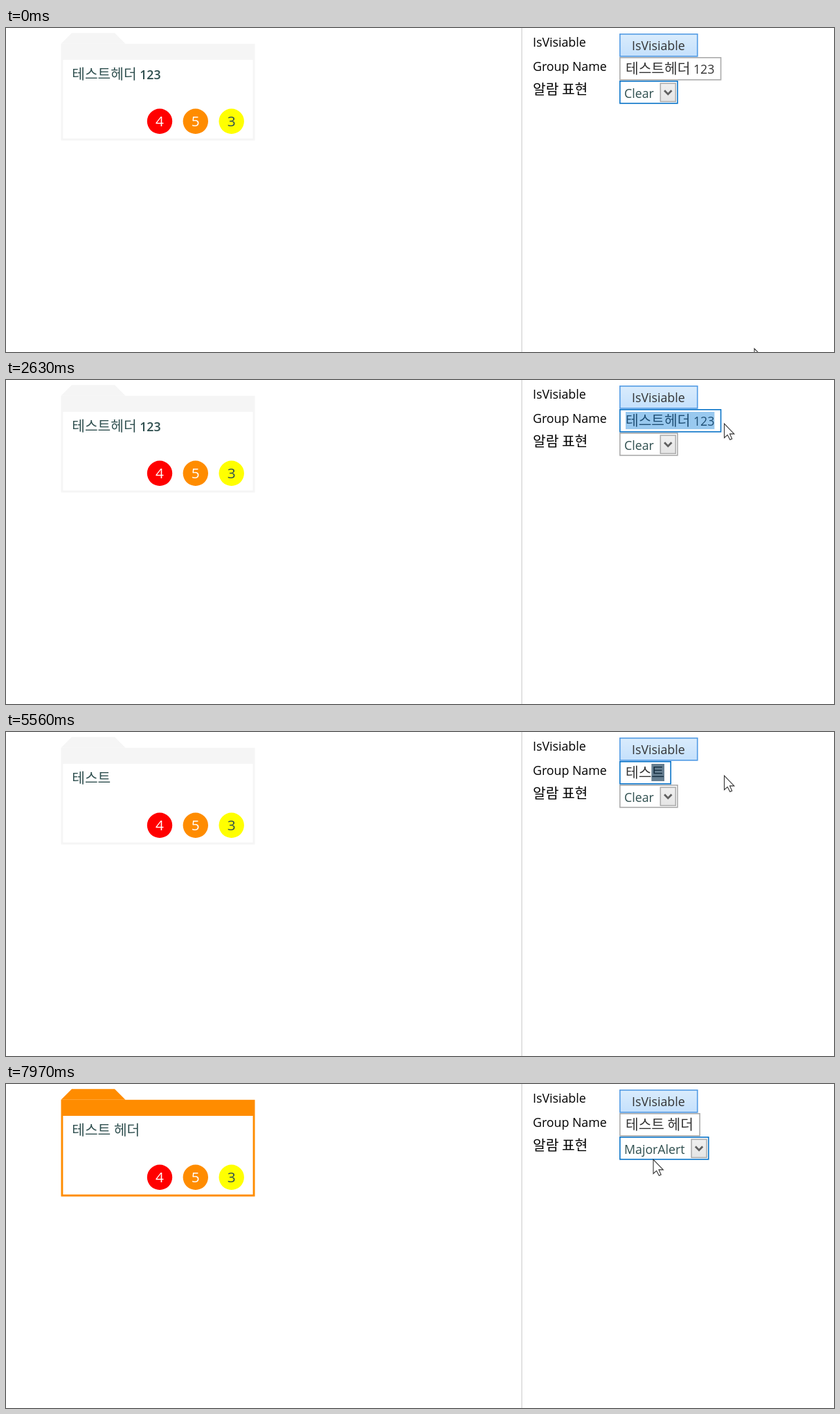
Write an HTML page with a canvas that moves like this. It is 1196x468 px and loops after 8000 ms.

```html
<!DOCTYPE html>
<html lang="ko">
<head>
<meta charset="utf-8">
<title>Group control</title>
<style>
  html, body { margin: 0; width: 100%; height: 100%; overflow: hidden; background: #fff; }
  canvas { display: block; }
</style>
</head>
<body>
<canvas id="stage" width="1196" height="468"></canvas>
<script>
const ctx = document.getElementById('stage').getContext('2d');
const LOOP = 8000;
const LATIN = '"Open Sans", "Noto Sans", sans-serif';
const HANGUL = '"Noto Sans CJK KR", "Noto Sans CJK JP", "Noto Sans CJK", sans-serif';
const BLUE = '#0a74c8', LIGHT_BLUE = '#569de5', GRAY = '#ababab', SLATE = '#2f4f4f';
const BLUE_FILL = ['#daecfc', '#c4e0fc'];
const HOVER_FILL = ['#ecf4fc', '#dcecfc'];
const GRAY_FILL = ['#f0f0f0', '#e5e5e5'];
const ALERTS = ['MajorAlert', 'Clear', 'CriticalAlert', 'Disconnect', 'MinorAlert', 'Normal', 'Warning'];

// [time, text, is the last syllable still being composed]
const TYPING = [
  [0, '테스트헤더 123'],
  [3010, 'ㅌ', true], [3170, '테', true], [3400, '테스', true], [3480, '테스트', true],
  [3780, '테스트 '], [4090, '테스트'], [4240, '테스'], [4410, '테'], [4560, ''],
  [4960, 'ㅌ', true], [5020, '테', true],
  [5250, '텟', true], [5330, '테스', true], [5410, '테슽', true],
  [5560, '테스트', true], [5640, '테스트 '], [5720, '테스트 ㅎ', true],
  [5870, '테스트 헤', true], [5950, '테스트 헫', true], [6020, '테스트 헤더', true],
  [6490, '테스트 헤더']
];

// [first step, last step, number of steps, x, y]
const POINTER_START = [1081, 463];
const MOVES = [
  [70, 510, 7, 945, 30], [690, 690, 1, 949, 26.5], [2080, 2250, 3, 1037.5, 63],
  [6490, 6725, 4, 1046, 181], [6805, 7120, 5, 900, 90],
  [7365, 7740, 6, 936, 121], [7970, 7970, 1, 935, 109]
];

const last = (list, t) => list.filter(item => item[0] <= t).pop();
const smooth = p => p * p * (3 - 2 * p);

function stepped(t, start, end, count) {
  if (t < start) return 0;
  if (t >= end) return 1;
  return (1 + Math.floor((t - start) / (end - start) * (count - 1))) / count;
}

function pointerAt(t) {
  let [x, y] = POINTER_START;
  for (const [start, end, count, toX, toY] of MOVES) {
    const p = smooth(stepped(t, start, end, count));
    x += (toX - x) * p;
    y += (toY - y) * p;
  }
  return { x, y };
}

// Hangul and Latin runs use separate fonts; returns the total advance.
function text(str, x, y, color, { weight = 400, paint = true } = {}) {
  const from = x;
  ctx.fillStyle = color;
  for (const run of str.match(/[ㄱ-힣]+|[^ㄱ-힣]+/g) || []) {
    ctx.font = /[ㄱ-힣]/.test(run) ? `400 20.3px ${HANGUL}` : `${weight} 17.75px ${LATIN}`;
    if (paint) ctx.fillText(run, x, y);
    x += ctx.measureText(run).width;
  }
  return x - from;
}
const widthOf = str => text(str, 0, 0, '#000', { paint: false });

function rect(x, y, w, h, color) {
  ctx.fillStyle = color;
  ctx.fillRect(x, y, w, h);
}

function box(x, y, w, h, border, fill = ['#fff', '#fff'], line = 1.6) {
  const gradient = ctx.createLinearGradient(0, y, 0, y + h);
  fill.forEach((color, i) => gradient.addColorStop(i, color));
  rect(x, y, w, h, gradient);
  ctx.strokeStyle = border;
  ctx.lineWidth = line;
  ctx.strokeRect(x + line / 2, y + line / 2, w - line, h - line);
}

function polygon(points) {
  ctx.beginPath();
  points.forEach(([x, y]) => ctx.lineTo(x, y));
  ctx.closePath();
}

function badge(x, label, fill, color) {
  ctx.beginPath();
  ctx.arc(x, 134.8, 18.2, 0, Math.PI * 2);
  ctx.fillStyle = fill;
  ctx.fill();
  ctx.font = `400 20.8px ${LATIN}`;
  ctx.textAlign = 'center';
  ctx.fillStyle = color;
  ctx.fillText(label, x, 142.4);
  ctx.textAlign = 'left';
}

function folder(name, color, alpha) {
  ctx.globalAlpha = alpha;
  ctx.fillStyle = color;
  polygon([[79.5, 22.8], [95, 7.3], [157, 7.3], [172.5, 22.8]]);
  ctx.fill();
  rect(79.5, 22.8, 280, 139.7, color);
  rect(82.4, 46, 274.2, 113.6, '#fff');
  text(name, 95.3, 74.3, SLATE, { weight: 600 });
  badge(222, '4', '#f00', '#fff');
  badge(273.8, '5', '#ff8c00', '#fff');
  badge(325.7, '3', '#ff0', SLATE);
  ctx.globalAlpha = 1;
}

function textBox(value, composing, focused, selected) {
  const x = 895, width = widthOf(value);
  box(886, 42, 19 + width, 33.6, focused ? BLUE : GRAY);
  text(value, x, 66, '#333');
  if (!focused) return;
  if (selected) {
    rect(x, 46, width, 25, 'rgba(0,120,215,.4)');
  } else if (composing) {
    const head = widthOf(value.slice(0, -1));
    rect(x + head, 46, width - head, 25, 'rgba(0,43,72,.6)');
  } else {
    rect(x - 0.5 + width, 46.5, 1.4, 24, '#999');
  }
}

function comboBox(value, focused, lit) {
  const width = 42 + widthOf(value);
  box(886, 76, width, 33.6, focused ? BLUE : GRAY);
  text(value, 893, 100.7, SLATE);
  const x = 886 + width - 26.2;
  box(x, 79.2, 23.4, 27.8, lit ? LIGHT_BLUE : '#acacac', lit ? BLUE_FILL : GRAY_FILL, 1.5);
  const mid = x + 11.7;
  ctx.beginPath();
  ctx.moveTo(mid - 5.2, 90.2);
  ctx.lineTo(mid, 95.6);
  ctx.lineTo(mid + 5.2, 90.2);
  ctx.strokeStyle = '#606060';
  ctx.lineWidth = 2.8;
  ctx.stroke();
}

function popup(active) {
  box(859, 110.6, 111.6, 224.4, GRAY, undefined, 1.5);
  ALERTS.forEach((name, i) => {
    const y = 113.6 + i * 31.1;
    if (i === active) rect(862, y, 105.8, 31.1, '#b0d6f0');
    text(name, 866.5, y + 22.6, SLATE);
  });
}

function arrow({ x, y }) {
  ctx.save();
  ctx.translate(x, y);
  polygon([[0, 0], [0, 20.4], [4.6, 16.3], [8.3, 23.3], [11.2, 22], [8, 14.9], [14.3, 14.9]]);
  ctx.fillStyle = '#fff';
  ctx.fill();
  ctx.strokeStyle = '#333';
  ctx.lineWidth = 1.1;
  ctx.stroke();
  ctx.restore();
}

function folderAlpha(t) {
  const fade = start => Math.min(5, Math.max(0, Math.floor((t - start) / 78))) / 5;
  return 1 - fade(690) + fade(1540);
}

function draw(t) {
  const pointer = pointerAt(t);
  const [, value, composing] = last(TYPING, t);
  const focus = last([[0, 'combo'], [690, 'button'], [2165, 'text'], [7290, ''], [7900, 'combo']], t)[1];
  const picked = t >= 7900;
  const open = t >= 7290 && !picked;
  const overCombo = pointer.x > 886 && pointer.x < 971 && pointer.y > 76 && pointer.y < 109;

  rect(0, 0, 1196, 468, '#fff');
  folder(value, picked ? '#ff8c00' : '#f5f5f5', folderAlpha(t));
  rect(744.3, 0, 1.5, 468, '#d9d9d9');

  text('IsVisiable', 761, 27.4, '#000');
  text('Group Name', 761, 61.6, '#000');
  text('알람 표현', 761, 95.8, '#000');

  const unchecked = t >= 768 && t < 1540;
  box(886, 8, 113.5, 33.6, focus === 'button' ? BLUE : LIGHT_BLUE, unchecked ? HOVER_FILL : BLUE_FILL);
  text('IsVisiable', 904, 32, '#333');
  textBox(value, composing, focus === 'text', t >= 2630 && t < 3010);
  comboBox(picked ? 'MajorAlert' : 'Clear', focus === 'combo', open || (overCombo && !picked));
  if (open) popup(pointer.y > 113.6 ? 0 : 1);
  arrow(pointer);
}

const start = performance.now();
function frame() {
  draw((performance.now() - start) % LOOP);
  requestAnimationFrame(frame);
}
frame();
</script>
</body>
</html>
```
